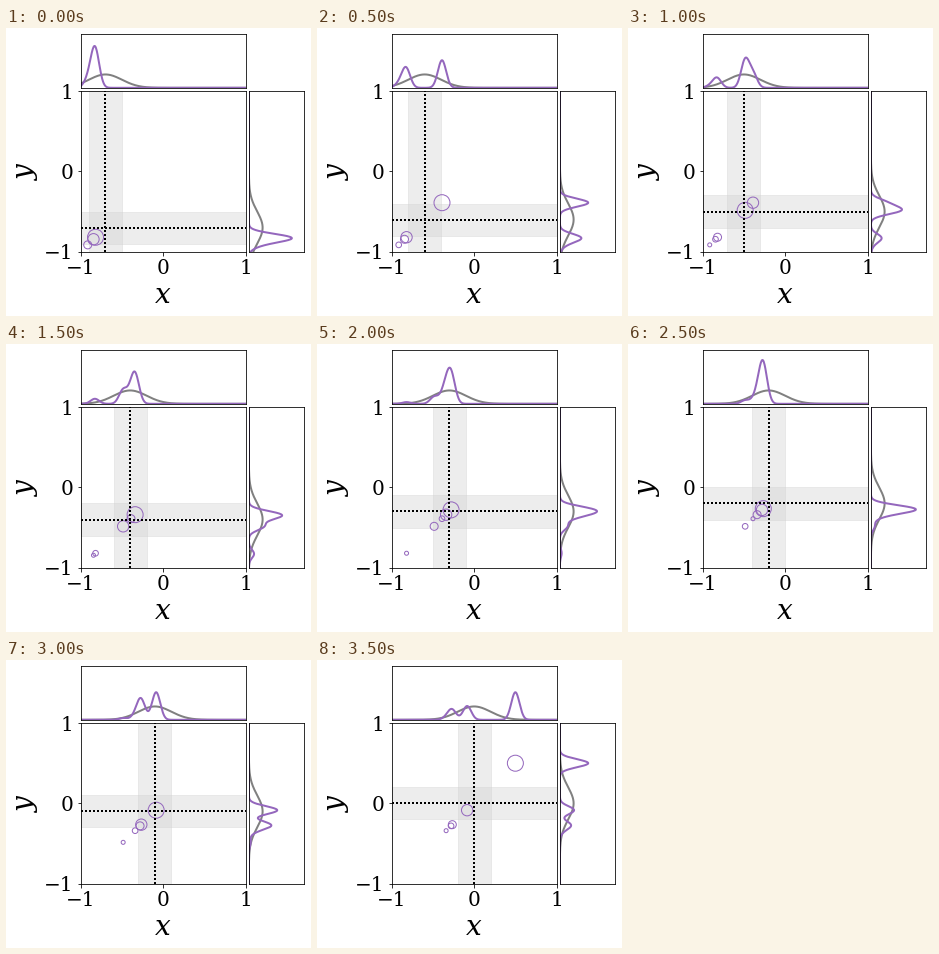
A matplotlib script that plays this animation: 305x288 px, repeating every 6 s.

```python
import numpy as np
import matplotlib.pyplot as plt
from matplotlib.animation import FuncAnimation

W, H, DPI = 305, 288, 72
plt.rcParams.update({
    "font.family": "DejaVu Serif",
    "mathtext.fontset": "dejavuserif",
    "font.size": 20,
})

# Observations arrive one per step; each weighs half as much as the next newer.
SAMPLES = np.array([-0.915, -0.845, -0.82, -0.39, -0.485, -0.34,
                    -0.28, -0.265, -0.085, 0.5])
WEIGHTS = 0.5 ** np.arange(5)
STEPS = 8
SPREAD, BANDWIDTH = 0.2, 0.05
grid = np.linspace(-1, 1, 401)

fig = plt.figure(figsize=(W / DPI, H / DPI), dpi=DPI, facecolor="white")


def pixel_axes(left, top, width, height):
    return fig.add_axes([left / W, 1 - (top + height) / H, width / W, height / H])


main = pixel_axes(74.7, 63.05, 164.9, 160.65)
top = pixel_axes(74.7, 6.25, 164.9, 53.55)
side = pixel_axes(242.9, 63.05, 55.0, 160.65)

main.set(xlim=(-1, 1), ylim=(-1, 1), xticks=[-1, 0, 1], yticks=[-1, 0, 1])
main.set_xlabel("$x$", fontsize=28)
main.set_ylabel("$y$", fontsize=28)
top.set(xlim=(-1, 1), ylim=(0, 8), xticks=[], yticks=[])
side.set(xlim=(0, 8), ylim=(-1, 1), xticks=[], yticks=[])

band = dict(color="lightgray", alpha=0.4)
dotted = dict(color="black", ls=(0, (1, 1)), lw=2)
v_band = main.axvspan(-SPREAD, SPREAD, **band)
h_band = main.axhspan(-SPREAD, SPREAD, **band)
v_line = main.axvline(0, **dotted)
h_line = main.axhline(0, **dotted)
circles = main.scatter([], [], facecolors="none", edgecolors="tab:purple", linewidths=1)


def curve_pair(color):
    return (top.plot([], [], color=color, lw=2)[0],
            side.plot([], [], color=color, lw=2)[0])


prior = curve_pair("gray")
estimate = curve_pair("tab:purple")


def gauss(x, mean, sigma):
    return np.exp(-0.5 * ((x - mean) / sigma) ** 2) / (sigma * np.sqrt(2 * np.pi))


def set_curves(pair, density):
    pair[0].set_data(grid, density)
    pair[1].set_data(density, grid)


def update(frame):
    step = min(frame, STEPS - 1)
    mean = -0.7 + 0.1 * step
    recent = SAMPLES[:step + 3][::-1][:len(WEIGHTS)]
    weights = WEIGHTS[:len(recent)]

    v_band.set_x(mean - SPREAD)
    h_band.set_y(mean - SPREAD)
    v_line.set_xdata([mean, mean])
    h_line.set_ydata([mean, mean])
    circles.set_offsets(np.column_stack([recent, recent]))
    circles.set_sizes(256 * weights)

    density = gauss(grid[:, None], recent, BANDWIDTH) @ weights / WEIGHTS.sum()
    set_curves(prior, gauss(grid, mean, SPREAD))
    set_curves(estimate, density)
    return v_band, h_band, v_line, h_line, circles, *prior, *estimate


anim = FuncAnimation(fig, update, frames=12, interval=500, repeat=True,
                     repeat_delay=0, blit=False)
plt.show()
```
